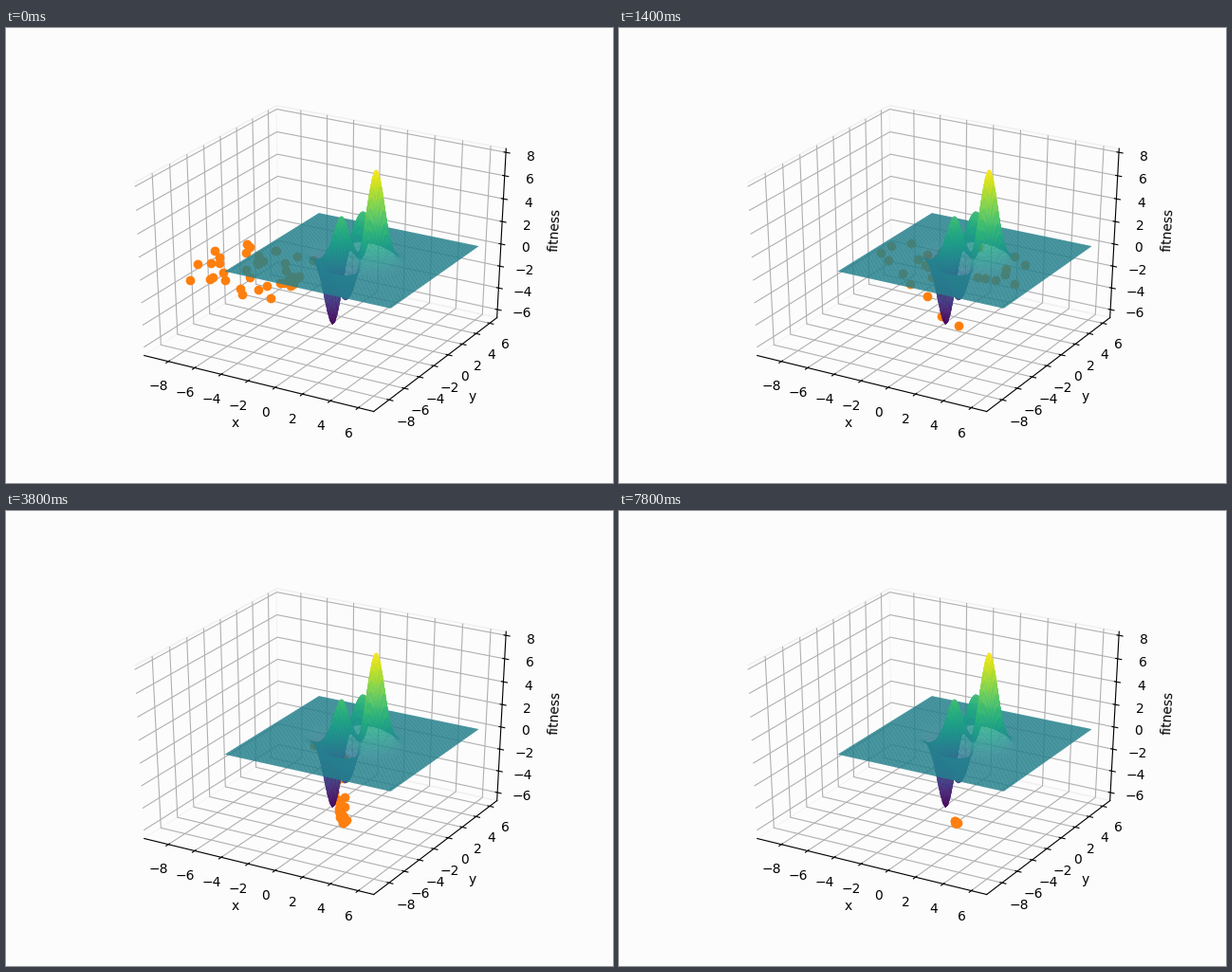
Recreate the animation shown at these times as a matplotlib script. Size 640 px wide and 480 px high, loop 8 s.

```python
import numpy as np
import matplotlib.pyplot as plt
from matplotlib.animation import FuncAnimation

FRAMES, STEP_MS = 40, 200
PAPER = "#fcfcfc"


def peaks(x, y):
    return (3 * (1 - x)**2 * np.exp(-x**2 - (y + 1)**2)
            - 10 * (x / 5 - x**3 - y**5) * np.exp(-x**2 - y**2)
            - np.exp(-(x + 1)**2 - y**2) / 3)


def padded(lo, hi):
    pad = (hi - lo) / 48
    return lo - pad, hi + pad


# ---- swarm: damped random pulls toward the lowest point ----
COUNT = 40
GOAL = np.array([0.228, -1.626])
INERTIA, PULL = 0.76, 0.22


def fly(seed=4):
    rng = np.random.default_rng(seed)
    pos = rng.uniform(-9, -1, (COUNT, 2))
    vel = rng.uniform(-6, 2.5, (COUNT, 2))
    path = [pos]
    for _ in range(FRAMES - 1):
        pull = rng.uniform(0, PULL, (COUNT, 2))
        vel = INERTIA * vel + pull * (GOAL - pos)
        pos = pos + vel
        path.append(pos)
    return path


path = fly()

# ---- scene ----
fig = plt.figure(figsize=(6.4, 4.8), dpi=100, facecolor=PAPER)
ax = fig.add_axes([0.125, 0.11, 0.775, 0.77], projection="3d", facecolor=PAPER)
ax.apply_aspect = lambda position=None: None     # let the view fill a wide box
ax.set_box_aspect((1, 1, 1), zoom=3**0.5 / 1.8294640721620434)
ax.view_init(elev=30, azim=-60)

for axis in (ax.xaxis, ax.yaxis, ax.zaxis):
    axis.pane.set_alpha(1)
    axis.pane.set_facecolor(PAPER)
    axis.pane.set_edgecolor("#f0f0f0")

grid = np.linspace(-6, 6, 100)
gx, gy = np.meshgrid(grid, grid)
surface = ax.plot_surface(gx, gy, peaks(gy, gx), rstride=1, cstride=1,
                          cmap="viridis", alpha=0.83, linewidth=0.15)
# Thin edges in the face colours close the seams between the cells.
surface.set_edgecolor(surface.cmap(surface.norm(surface.get_array())))
swarm, = ax.plot([], [], [], "o", color="#ff7f0e")

ax.set_xlim(*padded(-9.52, 6.75))
ax.set_ylim(*padded(-9.64, 6.75))
ax.set_zlim(*padded(-6.46, 8.02))
ax.set_xlabel("x")
ax.set_ylabel("y")
ax.set_zlabel("fitness")

# The camera never moves, so the surface is projected only once.
fig.canvas.draw()
surface.do_3d_projection = lambda: 0


def draw(frame):
    x, y = path[frame].T
    swarm.set_data_3d(x, y, peaks(x, y))
    return swarm,


anim = FuncAnimation(fig, draw, frames=FRAMES, interval=STEP_MS, repeat=True,
                     repeat_delay=0, blit=False)
plt.show()
```
